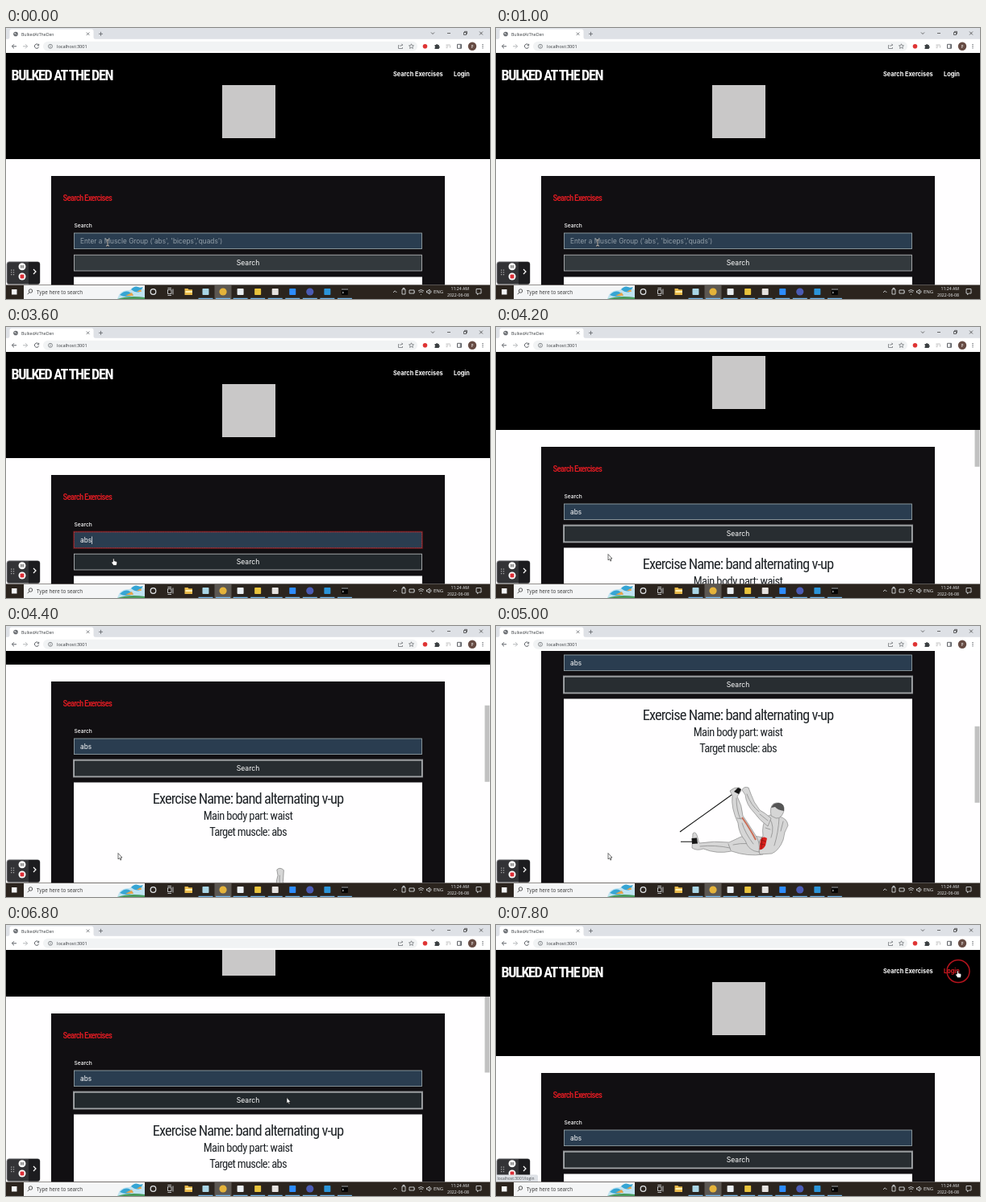
An HTML page that plays this animation: 600 by 337 pixels, repeating every 8 s.

```html
<!DOCTYPE html>
<html lang="en">
<head>
<meta charset="utf-8">
<title>Exercise search</title>
<style>
html, body { margin: 0; width: 100%; height: 100%; overflow: hidden; background: #fff; }
svg { display: block; width: 100%; height: 100%; }
text { font-family: 'Open Sans', 'Noto Sans', sans-serif; white-space: pre; }
.ui { font-family: Inter, 'Open Sans', sans-serif; fill: #fff; }
.head { font-family: 'Roboto Condensed', 'Open Sans Condensed', 'Liberation Sans Narrow', Roboto, sans-serif; font-stretch: condensed; }
.mid { text-anchor: middle; }
.line { fill: none; stroke: #5f6368; stroke-width: 1; }
.tray { fill: none; stroke: #e4e7ea; stroke-width: .8; }
.skin { fill: #d6d6d6; stroke: #777; stroke-width: .6; stroke-linejoin: round; }
.shade { fill: none; stroke: #969696; stroke-width: .9; stroke-linecap: round; }
.band { stroke: #111; stroke-width: 1.1; }
.dark { fill: #161616; }
</style>
</head>
<body>
<svg viewBox="0 0 600 337" preserveAspectRatio="none">
  <defs>
    <clipPath id="view"><rect y="31" width="600" height="288.5"/></clipPath>
  </defs>

  <g clip-path="url(#view)">
    <rect y="31" width="600" height="289" fill="#fffeff"/>
    <rect id="thumb" x="593.5" width="6" height="95" fill="#c1c1c1"/>
    <g id="page">
      <rect y="31" width="600" height="132" fill="#000"/>
      <text class="head" x="6.5" y="65" font-size="18" font-weight="600" letter-spacing="-1.35" fill="#fff">BULKED AT THE DEN</text>
      <rect x="268" y="71" width="66" height="66" fill="#c9c8c8"/>
      <text class="ui" x="480" y="59.6" font-size="7.35" font-weight="700">Search Exercises</text>
      <text class="ui" id="login" x="555" y="59.6" font-size="7.35" font-weight="700">Login</text>

      <rect x="56" y="184" width="488" height="500" fill="#110f12"/>
      <text class="head" x="70.5" y="215" font-size="10.8" font-weight="500" letter-spacing="-.78" fill="#e01b22">Search Exercises</text>
      <text class="ui" x="84.5" y="248.3" font-size="6.65" font-weight="500">Search</text>
      <rect id="glow" x="84" y="254.5" width="432" height="20.6" fill="none" stroke="#641c20" stroke-width="1.6"/>
      <rect id="field" x="84.5" y="255" width="431" height="19.6" fill="#2a3d50" stroke-width=".8"/>
      <text class="ui" id="entry" x="92" y="268" font-size="8.25"></text>
      <path id="caret" stroke="#fff" stroke-width=".7"/>
      <rect id="ring" x="83.8" y="281.4" width="432.4" height="21.2" fill="none" stroke="#8b8d90" stroke-width="1.6"/>
      <rect id="button" x="84.5" y="282.2" width="431" height="19.8" stroke="#c0c3c5" stroke-width=".8"/>
      <text class="ui mid" x="300" y="295" font-size="8.6">Search</text>

      <rect x="84" y="309.5" width="432" height="350" fill="#fffeff"/>
      <g id="result">
        <g class="mid" fill="#212529">
          <text class="head" x="300" y="335.5" font-size="18.5" letter-spacing="-.95">Exercise Name: band alternating v-up</text>
          <text class="head" x="300" y="356" font-size="14.5" letter-spacing="-.6">Main body part: waist</text>
          <text class="head" x="300" y="376" font-size="14.5" letter-spacing="-.7">Target muscle: abs</text>
        </g>
        <g transform="translate(0 219)">
          <path class="band" d="M229 268.3H247"/>
          <line id="strap" class="band" x1="228" y1="256"/>
          <path class="skin" d="M334 264Q318 259 304 262L289 269Q270 267 252 270L249 260Q247 255 244 258L243 276Q249 280 257 277Q274 284 292 280Q312 287 331 284Z"/>
          <path class="shade" d="M253 274Q272 272 290 276M294 272Q312 268 325 274M288 271L291 279"/>
          <path class="dark" d="M242.5 264l6.5-.5 1 7-7 .5Z"/>
          <g id="torso">
            <path class="skin" d="M327 284Q322 270 331 261Q329 247 336 237Q343 232 351 237Q361 239 362 248Q357 256 356 266Q351 279 342 283Z"/>
            <path class="shade" d="M339 239Q346 249 341 263M351 239Q350 257 345 273M356 243L353 255M334 251L340 253"/>
            <path fill="#d9201c" d="M328 266Q331 260 336 264L334 273Q331 279 326 278Z"/>
            <path class="shade" style="stroke:#8f1713" d="M329 266l5 2M328 271l5 1M330 263l-1 14"/>
            <path class="skin" d="M341 239Q333 232 327 229Q319 219 316 209L313 201Q307 199 305 204L309 210Q310 222 320 232Q327 242 337 249Z"/>
            <path class="shade" d="M311 209Q316 223 326 231M327 234L337 242"/>
            <path class="skin" d="M341 236Q339 225 344 221Q351 218 356 223Q359 229 354 236Q351 240 347 239Z"/>
            <path fill="#555" d="M341 226Q344 219 351 220Q358 221 357 230Q349 229 346 225Z"/>
          </g>
          <g id="leg">
            <path class="skin" d="M326 281Q313 280 309 267Q301 258 300 245Q291 226 293 211L290 205Q295 200 302 201L304 205L299 212Q305 223 306 236Q313 246 321 259Q328 269 326 281Z"/>
            <path class="shade" d="M298 214Q298 229 303 240M305 245Q309 258 319 271M299 239l7 1"/>
            <path fill="none" stroke="#c9705a" stroke-width="2" d="M305 238Q315 252 322 266"/>
            <path class="dark" d="M295 206l5-5 4 2-3 6Z"/>
          </g>
        </g>
      </g>
    </g>
  </g>

  <!-- browser frame -->
  <rect width="600" height="14" fill="#dee1e6"/>
  <path d="M2 14Q4.5 14 4.5 11V4Q4.5 1.5 7 1.5H106Q108.5 1.5 108.5 4V11Q108.5 14 111 14Z" fill="#fff"/>
  <rect y="13.8" width="600" height="17.2" fill="#fff"/>
  <circle cx="12" cy="7.5" r="2.8" fill="#5f6368"/>
  <path d="M10 6.5h2.2l-.6 1.5H10.5M12.5 9l1.500-1.500" stroke="#fff" stroke-width=".6" fill="none"/>
  <text x="19" y="9.500" font-size="5.200" fill="#3c4043">BulkedAtTheDen</text>
  <path class="line" style="stroke-width:.8" d="M99.800 5.500l3.600 3.600m0-3.600l-3.600 3.600M115 7.300h5m-2.500-2.500v5"/>
  <path class="line" style="stroke:#333;stroke-width:.7" d="M527 5.500l2 2 2-2M547 6.500h4M567.500 5.500h3v3h-3ZM568.500 5.300v-1h3v3h-.8M587 4.500l4 4m0-4l-4 4"/>
  <rect x="46" y="16.800" width="464" height="12" rx="6" fill="#f1f3f4"/>
  <path class="line" d="M13 22.800H7.500m2.500-2.600l-2.600 2.600 2.600 2.600"/>
  <path class="line" style="stroke:#b4b7ba" d="M21 22.800h5.500m-2.500-2.600l2.600 2.600-2.600 2.600"/>
  <path class="line" d="M40.300 21a2.700 2.700 0 1 0 .4 2.500M40.700 19.800v2h-2"/>
  <circle class="line" cx="55" cy="22.800" r="2.500" style="stroke-width:.7"/>
  <path class="line" style="stroke-width:.7" d="M55 22.500v1.600m0-2.900v.6"/>
  <text x="63" y="24.800" font-size="5.600" fill="#303438">localhost:3001</text>
  <path class="line" style="stroke-width:.7" d="M487.500 21.500h-1v4h5v-1.500M488.500 23q.5-2 3-2m-1-1.300l1.300 1.300-1.300 1.300"/>
  <path class="line" style="stroke-width:.7" d="M502.500 19.800l.9 1.900 2.100.2-1.600 1.400.5 2.100-1.900-1.100-1.900 1.100.5-2.100-1.600-1.400 2.100-.2Z"/>
  <circle cx="519.500" cy="22.800" r="2.800" fill="#df3434"/>
  <path fill="#3c4043" d="M531.500 21h1.700a1 1 0 0 1 2 0h1.600v1.700a1 1 0 0 1 0 2v1.300h-5.300v-1.500a1 1 0 0 0 0-1.800Z"/>
  <path class="line" style="stroke:#aaa;stroke-width:.7" d="M545.500 21h5m-5 1.800h3m-3 1.800h2m3-3v3"/>
  <path class="line" d="M559.500 20.300h5v5h-5ZM563.300 20.300v5"/>
  <circle cx="578" cy="22.800" r="5.200" fill="#664b43"/>
  <text class="mid" x="578" y="24.700" font-size="5" fill="#fff">P</text>
  <path stroke="#5f6368" stroke-width="1.200" stroke-dasharray="1.200 1" d="M591 20v6"/>

  <!-- recorder -->
  <rect x="1" y="290.700" width="41" height="28" rx="3" fill="#333336" stroke="#929296" stroke-width=".8"/>
  <path d="M28 291h11q3 0 3 3v21.500q0 3-3 3H28Z" fill="#1c1c1f"/>
  <path stroke="#aaa" stroke-width="1.300" stroke-dasharray="1.200 1.600" d="M6.700 300.500v7m2.800-7v7"/>
  <g fill="#fff"><circle cx="20" cy="296.800" r="4.500"/><circle cx="20" cy="309" r="4.500"/></g>
  <path stroke="#333" stroke-width="1" d="M18.900 295v3.600m2.200-3.600v3.600"/>
  <rect x="17.600" y="306.600" width="4.800" height="4.800" rx="1" fill="#dd2e37"/>
  <path d="M34 300l3 3-3 3" fill="none" stroke="#fff" stroke-width="1.200"/>
  <g id="status">
    <path d="M0 310.500h50q2 0 2 2v7H0Z" fill="#dee1e6"/>
    <text x="1.500" y="316.800" font-size="4.900" fill="#4b4f53">localhost:3001/login</text>
  </g>

  <!-- taskbar -->
  <rect y="319.500" width="600" height="17.500" fill="#2b241e"/>
  <path fill="#f3f5f7" d="M7 325h6.500v6.500H7Z"/>
  <rect x="22" y="320" width="150" height="17" fill="#f4f5f6"/>
  <g class="line" style="stroke:#333;stroke-width:.8"><circle cx="30.500" cy="327" r="2.200"/><path d="M29 328.700l-2.300 2.500"/></g>
  <text x="38" y="330.500" font-size="6.250" fill="#333">Type here to search</text>
  <path fill="#bfe3f2" d="M138 337q3-12 15-11 13-8 19 0v11Z"/>
  <path fill="#36a5d4" d="M141 332q7-7 13-3l4 3q-9 4-17 0M155 325q5-6 11-2l4-1-4 6q-5 2-11-3"/>
  <path fill="#e7a44b" d="M148 333l8-4 2 4Zm14-5l5-3 1 3Z"/>
  <path fill="#47995b" d="M138 337q15-5 34-2v2Z"/>
  <rect x="258.500" y="320" width="21" height="17" fill="#5c5752"/>
  <circle class="tray" cx="182.500" cy="328" r="3.300" style="stroke-width:1.200"/>
  <path class="tray" d="M200.500 325.500h4.500v5h-4.500ZM207 324.500v7M200.500 323.500h4.500m-4.500 9h4.500"/>
  <path fill="#e8b94a" d="M221.500 324h4l1 1.300h4.500v6.700h-9.500Z"/>
  <path fill="#fff0b0" d="M222.500 327h8.500v2h-8.500Z"/>
  <g id="apps"></g>
  <g class="tray">
    <path d="M480 329l2.200-2.200 2.200 2.200M491 325h4v6h-4ZM492 325v-1.500h2v1.500M500 326h6v4h-6ZM506.500 327.500v1M511 327q3.500-3 7 0m-5.700 1.700q2.200-1.800 4.400 0M514.500 331v.8M521.500 327h1.500l2-2v6l-2-2h-1.500ZM526.500 326.500q1.200 1.500 0 3"/>
    <path d="M583 324.500h6v5.500h-2.800l-1.700 1.600V330H583Z"/>
  </g>
  <g fill="#f0f2f4">
    <text x="530" y="330.300" font-size="6">ENG</text>
    <text x="574" y="326.400" font-size="5.200" text-anchor="end">11:24 AM</text>
    <text x="574" y="334.300" font-size="5.200" text-anchor="end">2022-06-08</text>
  </g>

  <circle id="click" cx="573" cy="57.500" r="14" fill="none" stroke="#b3131c" stroke-width="1.500"/>
  <g id="cursor">
    <g id="beam" fill="none">
      <path stroke="#222" stroke-width="1.600" d="M-2-4q2 0 2 1 0-1 2-1M0-3v6M-2 4q2 0 2-1 0 1 2 1"/>
      <path stroke="#eee" stroke-width=".8" d="M-2-4q2 0 2 1 0-1 2-1M0-3v6M-2 4q2 0 2-1 0 1 2 1"/>
    </g>
    <path id="hand" fill="#fff" stroke="#111" stroke-width=".6" d="M-1.500 0V-3.500q.8-1.200 1.600 0V-1.200l2.600.8q1.300.4 1 2L3 4.500H-.8L-3.200 1q0-1.300 1.200-.8Z"/>
    <path id="arrow" fill="#fff" stroke="#111" stroke-width=".6" d="M0-3.500V4l1.700-1.500 1.100 2.600 1.200-.5L2.900 2H5Z"/>
  </g>
</svg>

<script>
const LOOP = 8000, STEP = 200;
const $ = id => document.getElementById(id);
const set = (id, attrs) => Object.entries(attrs).forEach(([k, v]) => $(id).setAttribute(k, v));
const show = (id, on) => $(id).style.display = on ? '' : 'none';

// Linear track through [time, value, value...] keys.
function track(keys, t) {
  const n = keys.findIndex(k => k[0] > t);
  if (n === 0) return keys[0].slice(1);
  if (n < 0) return keys[keys.length - 1].slice(1);
  const a = keys[n - 1], b = keys[n], p = (t - a[0]) / (b[0] - a[0]);
  return a.slice(1).map((v, i) => v + (b[i + 1] - v) * p);
}

const scrollKeys = [[4000, 0], [4200, 35], [4400, 115], [4600, 190], [4800, 219],
  [6400, 219], [6600, 145], [6800, 74], [7000, 20], [7200, 0]];
const cursorKeys = [[0, 126, 267], [1200, 126, 267], [1600, 129, 267], [3000, 129, 267],
  [3400, 133, 287], [3600, 134, 292], [3900, 134, 292], [4200, 139, 286], [5400, 139, 286],
  [6200, 340, 224], [6800, 348, 218], [7000, 370, 202], [7400, 515, 98], [7600, 567, 62], [7800, 573, 61]];

const apps = [['s', '#a9d5e5'], ['c', '#e4b33b'], ['s', '#e9eef2'], ['s', '#e8c33c'],
  ['s', '#e5e2df'], ['s', '#2d8cff'], ['c', '#4b5bb5'], ['s', '#2b94d8'], ['s', '#050505']];
$('apps').innerHTML = apps.map(([kind, fill], i) => {
  const x = 247.5 + i * 21.55;
  const icon = kind === 'c'
    ? `<circle cx="${x}" cy="328" r="4.6" fill="${fill}"/>`
    : `<rect x="${x - 4}" y="324" width="8" height="8" rx=".8" fill="${fill}"/>`;
  return icon + `<rect x="${x - 9}" y="335.8" width="18" height="1.2" fill="#76b9ed"/>`;
}).join('') + '<path d="M416 325h8M417 328l1.5 1-1.5 1" stroke="#ddd" stroke-width=".8" fill="none"/>';

function drawField(t) {
  const focus = t >= 1400 && t < 3800;
  const typed = t < 1800 ? '' : t < 2000 ? 'a' : t < 2600 ? 'ab' : 'abs';
  const entry = $('entry');
  entry.textContent = typed || "Enter a Muscle Group ('abs', 'biceps','quads')";
  entry.style.fill = typed ? '#fff' : '#94a0aa';
  show('glow', focus);
  set('field', { stroke: focus ? '#b9383e' : '#9eacb0', 'stroke-dasharray': focus ? '1.6 .6' : 'none' });
  const x = 92.5 + (typed ? entry.getComputedTextLength() : 0);
  set('caret', { d: `M${x} 260.5v9.5` });
  show('caret', focus && (t + 800) % 1000 < 500);

  const hover = (t >= 3400 && t < 4000) || (t >= 6800 && t < 7000);
  show('ring', t >= 3800);
  set('button', { fill: hover ? '#23292d' : t >= 3800 ? '#282d31' : '#33393d' });
}

function drawFigure(t) {
  const down = .5 - .5 * Math.cos((t - 5000) / 2400 * 2 * Math.PI);
  const turn = -60 * down, a = turn * Math.PI / 180;
  const dx = -26, dy = -68;
  set('leg', { transform: `rotate(${turn} 325 273)` });
  set('torso', { transform: `rotate(${48 * down} 332 274)` });
  set('strap', {
    x2: 325 + dx * Math.cos(a) - dy * Math.sin(a),
    y2: 273 + dx * Math.sin(a) + dy * Math.cos(a)
  });
}

function draw(t) {
  const [s] = track(scrollKeys, t), [x, y] = track(cursorKeys, t);
  set('page', { transform: `translate(0 ${-s})` });
  set('thumb', { y: 70 + s * .25 });
  show('thumb', s > 0);
  show('result', t >= 4000);
  drawField(t);
  drawFigure(t);

  const shape = t < 3400 ? 'beam' : t < 4000 || t >= 7600 ? 'hand' : 'arrow';
  ['beam', 'hand', 'arrow'].forEach(id => show(id, id === shape));
  set('cursor', { transform: `translate(${x} ${y})` });
  const onLogin = t >= 7600;
  $('login').style.fill = onLogin ? '#e01b22' : '#fff';
  show('status', onLogin);
  show('click', t >= 7800);
}

const start = performance.now();
function tick() {
  const t = (performance.now() - start) % LOOP;
  draw(Math.floor(t / STEP) * STEP);
  requestAnimationFrame(tick);
}
tick();
</script>
</body>
</html>
```
